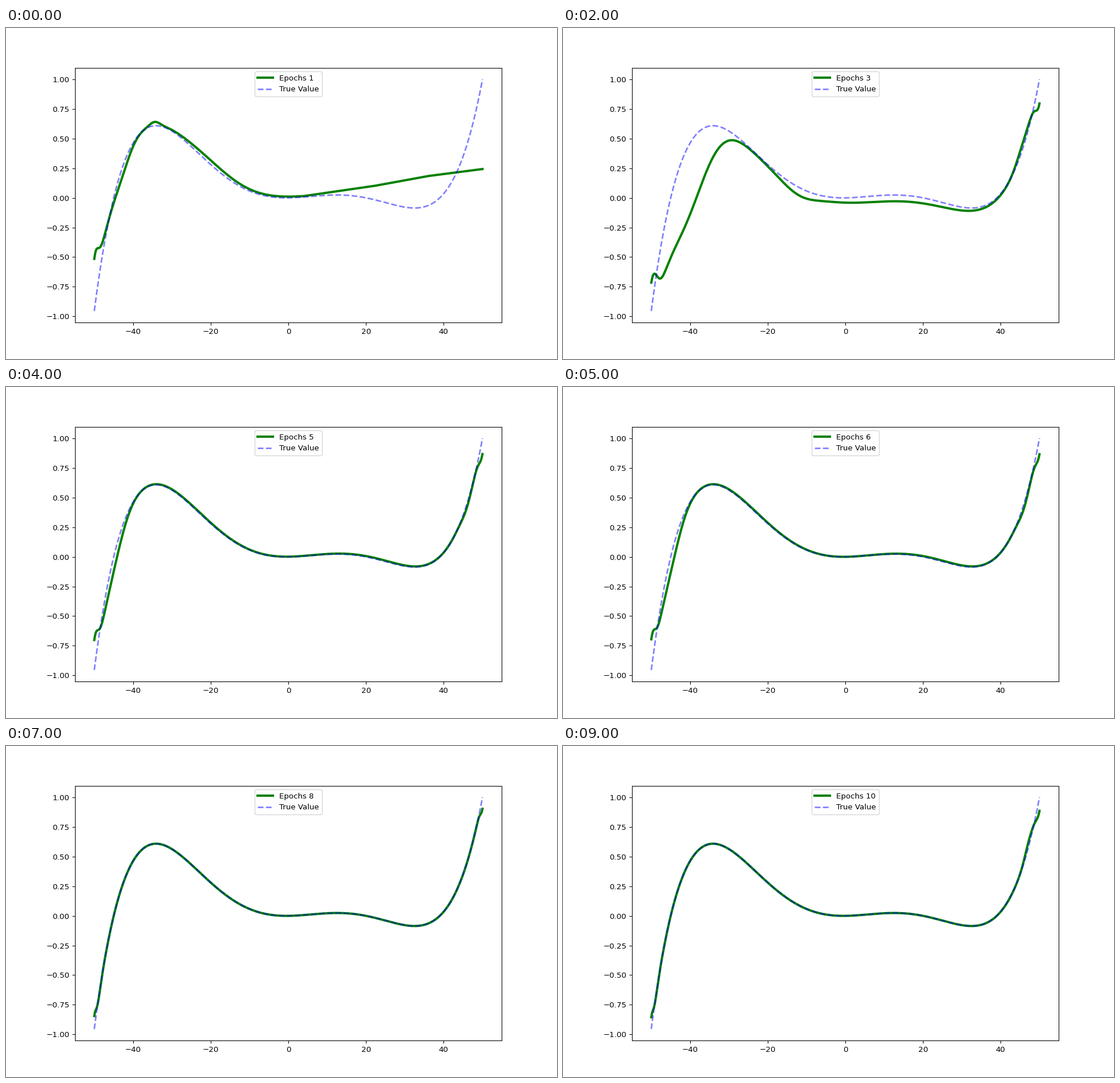
These frames come from a looping animation (966 px wide and 580 px high, 10000 ms). A matplotlib script:

```python
import numpy as np
import matplotlib.pyplot as plt
from matplotlib.animation import FuncAnimation

X = np.linspace(-50, 50, 501)


def quintic(x):
    return x * (x + 1) * (x - 20) * (x + 45) * (x - 39)


truth = quintic(X) / quintic(X).max()


def bump(height, centre, width):
    return height * np.exp(-((X - centre) / width) ** 2 / 2)


def predict(left, right, *bumps):
    """True curve plus a miss (height, width) at each end and bumps between."""
    ends = bump(left[0], -50, left[1]) + bump(right[0], 50, right[1])
    return truth + ends + sum(bump(*b) for b in bumps)


def mix(a, b, w):
    return a + (b - a) * w


# The first fit misses the right half and climbs there in almost straight runs.
e1 = predict((.28, .9), (0, 1), (.16, -50, 2), (-.08, -43, 2.1),
             (.03, -34.4, 1.2), (.034, -20.5, 6), (.011, -3, 9))
climb = np.interp(X, (4, 22, 36, 50), (.015, .1, .184, .243))
e1 = np.where(X < 4, e1, climb)

e2 = predict((.234, 1.2), (-.23, .9), (-.36, -45.4, 2.4), (-.04, -39.5, 3),
             (.011, -24, 9), (.05, 45.5, 1.5))
e3 = predict((.43, 1.3), (-.205, .9), (-.62, -41.4, 5.6), (-.05, -12, 4),
             (-.053, 12, 16), (.055, 45.9, 1.8))
e4 = predict((.21, .65), (-.14, .7), (-.1, -47, 1.4), (.012, -2, 22),
             (.05, 46.5, 2.5))
e6 = predict((.285, .9), (-.134, .8), (-.135, -45.3, 2.6), (.008, -24, 9),
             (.008, 25, 8), (-.04, 46, 1.2))
e8 = predict((.11, .4), (-.097, .5), (-.016, -48.7, .5))
e10 = predict((.1, .4), (-.115, .75), (-.015, -48.8, .5), (.045, 47.2, 1))

epochs = [e1, e2, e3, e4, mix(e4, e6, .9), e6, mix(e6, e8, .1), e8,
          mix(e8, e10, .5), e10]

# 966 x 580 pixels
fig, ax = plt.subplots(figsize=(10, 6.00415), dpi=96.6)
model, = ax.plot(X, e1, color="green", lw=3, label="Epochs 1")
ax.plot(X, truth, "--", color="blue", lw=2, alpha=.5, label="True Value")
legend = ax.legend(loc="upper center")
ax.set_xlim(-55, 55)
pad = .05 * np.ptp(truth)
ax.set_ylim(truth.min() - pad, truth.max() + pad)


def update(i):
    model.set_ydata(epochs[i])
    legend.get_texts()[0].set_text(f"Epochs {i + 1}")
    return model, legend


anim = FuncAnimation(fig, update, frames=len(epochs), interval=1000,
                     repeat=True, repeat_delay=0)
plt.show()
```
